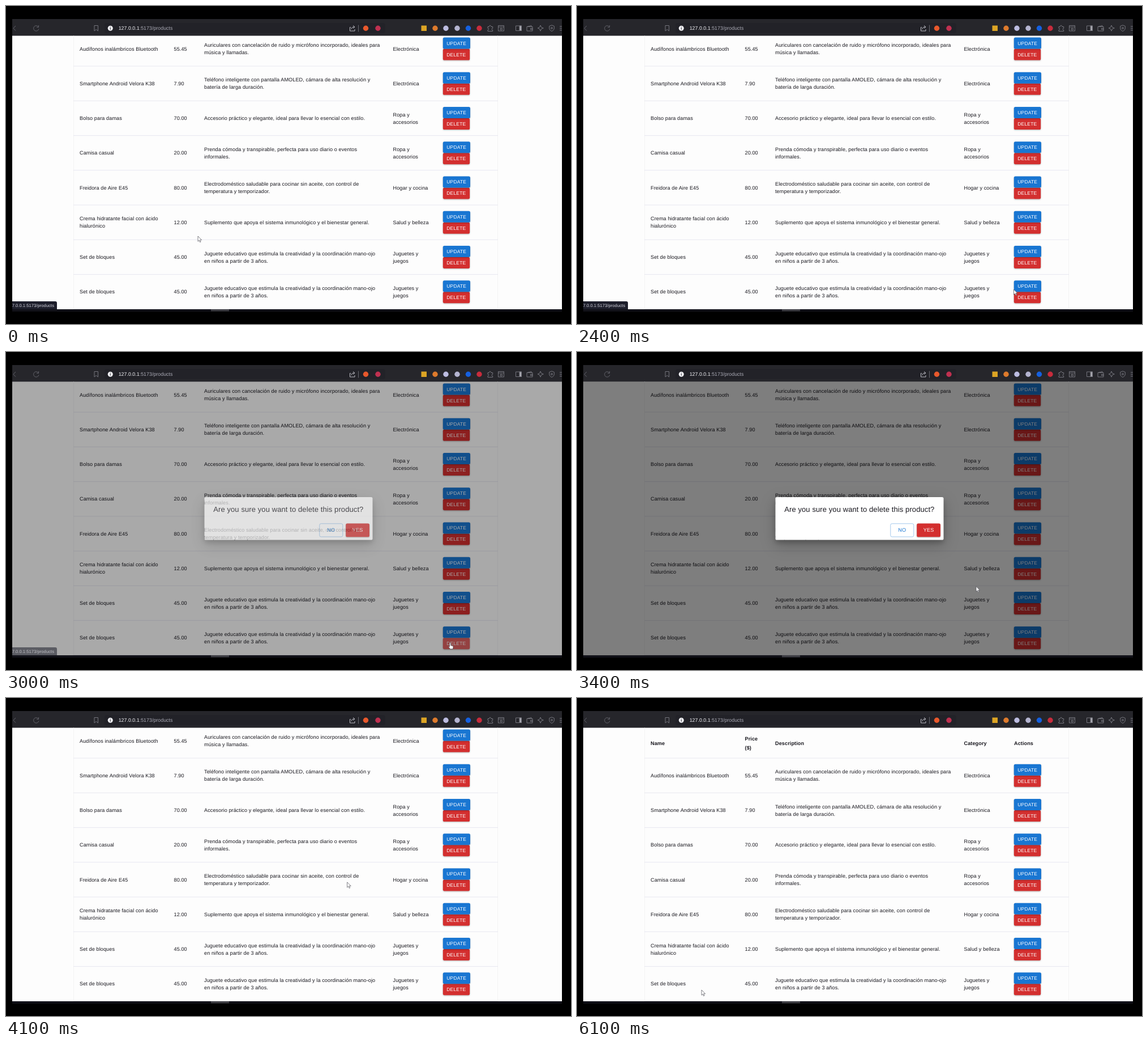
Recreate the animation shown at these times as an HTML page. Size 998 by 561 pixels, loop 6.2 s.

```html
<!DOCTYPE html>
<html lang="es">
<head>
<meta charset="utf-8">
<title>Products</title>
<style>
  html, body { margin: 0; width: 100%; height: 100%; overflow: hidden; background: #000; }
  svg { display: block; width: 998px; height: 561px; }
  text {
    font-family: "Liberation Sans", Arial, sans-serif;
    font-size: 9.1px; letter-spacing: .0107em; fill: #19181f;
    text-rendering: geometricPrecision; white-space: pre;
  }
  .head { font-weight: 700; }
  .btn { font-size: 8.45px; letter-spacing: .0286em; fill: #fff; }
  .choice { font-size: 9.1px; letter-spacing: .0286em; fill: #fff; }
  .no { fill: #1976d2; }
  .title { font-size: 13px; letter-spacing: .0075em; }
  .url { font-size: 8.9px; letter-spacing: 0; fill: #f2f2f6; }
  .status { font-size: 7.7px; letter-spacing: 0; fill: #d2d2dc; }
  .raised { filter: drop-shadow(0 1px .8px rgba(0,0,0,.28)); }
  .panel { filter: drop-shadow(0 5px 4px rgba(0,0,0,.2)) drop-shadow(0 8px 13px rgba(0,0,0,.22)); }
  .icon { fill: none; stroke: #74747c; stroke-width: 1; }
</style>
</head>
<body>
<svg id="stage" viewBox="0 0 998 561" xmlns="http://www.w3.org/2000/svg">
  <defs>
    <clipPath id="view"><rect x="11" y="52.5" width="971" height="482.5"/></clipPath>
    <clipPath id="window"><rect x="11" y="22" width="971" height="518"/></clipPath>
  </defs>
  <rect width="998" height="561"/>

  <g clip-path="url(#window)">
    <rect x="11" y="23" width="971" height="30" fill="#26262b"/>
    <rect x="174" y="30" width="496" height="18" rx="4" fill="#222228"/>
    <g class="icon">
      <g stroke="#62626a">
        <path d="M17 35l-4 4.3 4 4.3"/>
        <path d="M57 36.5a4.7 4.7 0 1 0 .9 4M57.6 34v3.4h-3.4"/>
      </g>
      <path d="M156 34.5h6.5v9.5l-3.2-2.6-3.3 2.6z"/>
      <path d="M609 37.5h-1.5v6.5h8.5v-3M610 41c.3-3 2-4 5.5-4M613 34.5l3 2.5-3 2.5" stroke="#bcbcc4"/>
      <path d="M622.5 33.5v12" stroke="#686870"/>
      <path d="M851 36.5h2.5c-.8-3 4-3 3.2 0h3v3c-2.5-.5-2.5 3.4 0 2.8v2.2h-8.7v-2.4c2.4.5 2.4-3.3 0-2.7z"/>
      <path d="M869.5 34.5h10v9.5h-10zM869.5 37h10M873 39.5h3.5v2.5h-3.5z"/>
      <path d="M900.5 35h10v8.5h-10z"/><path d="M907 35h3.5v8.5H907z" fill="#a8a8b0"/>
      <path d="M920 36.5h10v7.5h-10zM920 36.5l8-2v2M926.5 39.5h3.5v2h-3.5z"/>
      <path d="M944 34l1.5 3.5 3.8 1.5-3.8 1.5-1.5 3.7-1.5-3.7-3.4-1.5 3.4-1.5z"/>
      <path d="M964 33.8l4.3 1.7v3.5c0 2.8-1.8 4.4-4.3 5.5-2.5-1.1-4.3-2.7-4.3-5.5v-3.5z"/>
      <circle cx="964" cy="39" r="1.4"/>
      <path d="M978 36h6M978 39.3h6M978 42.6h6"/>
    </g>
    <g id="marks"></g>
    <circle cx="184.3" cy="39.3" r="4.5" fill="#f2f2f6"/>
    <path d="M184.3 38.6v3M184.3 36.6v1" stroke="#222228" stroke-width="1.1"/>
    <text class="url" x="198.7" y="42.3">127.0.0.1<tspan fill="#a9a9b4">:5173/products</tspan></text>

    <rect x="11" y="535" width="971" height="4" fill="#111118"/>
    <rect x="362" y="535" width="32" height="3.5" fill="#3e3e44"/>

    <g clip-path="url(#view)">
      <rect x="11" y="52" width="971" height="483" fill="#fdfdfd"/>
      <path d="M119.5 52v483M868.5 52v483" stroke="#f3f3f4"/>
      <g id="before"></g>
      <g id="after"></g>
      <rect id="ripple" x="771.8" y="504" width="47.4" height="20" rx="2.6" fill="#fff"/>
      <rect id="shade" x="11" y="52" width="971" height="483"/>
      <g id="dialog">
        <rect class="panel" x="350.5" y="256" width="297" height="75.5" rx="2.6" fill="#fff"/>
        <text class="title" x="366.2" y="281.5">Are you sure you want to delete this product?</text>
        <rect x="553.8" y="302.8" width="41" height="23.2" rx="2.6" fill="none" stroke="#8cbae8" stroke-width=".8"/>
        <text class="choice no" x="574.3" y="317.4" text-anchor="middle">NO</text>
        <rect id="yes" class="raised" x="600.2" y="302.5" width="41.8" height="23.8" rx="2.6"/>
        <rect id="yesRipple" x="600.2" y="302.5" width="41.8" height="23.8" rx="2.6" fill="#fff"/>
        <text class="choice" x="621.2" y="317.4" text-anchor="middle">YES</text>
      </g>
      <g id="status">
        <path d="M11 521h76q3 0 3 3v11H11z" fill="#1d1e2b"/>
        <text class="status" x="85" y="530.8" text-anchor="end">7.0.0.1:5173/products</text>
      </g>
    </g>
    <g id="cursor" fill="#fff" stroke="#4c4c55" stroke-width=".7" stroke-linejoin="round">
      <path id="arrow" d="M0 0v9.3l2.1-2 1.5 3.4 1.5-.7-1.5-3.2h3z"/>
      <path id="hand" d="M-.9 .8q1-1.6 2 0v3.4l3.4.8q1.2.4 1 1.8l-.6 3.6H0L-2.6 6.8q.2-1.4 1.7-.3z"/>
    </g>
  </g>
</svg>
<script>
const LOOP = 6200, STEP = 100;
const ROW = 61.24, TOP = 75.5;
const COLS = [130, 296.5, 350, 683.5, 772];
const $ = id => document.getElementById(id);

// "|" marks a line break inside a cell
const products = [
  ["Audífonos inalámbricos Bluetooth", "55.45", "Auriculares con cancelación de ruido y micrófono incorporado, ideales para|música y llamadas.", "Electrónica"],
  ["Smartphone Android Velora K38", "7.90", "Teléfono inteligente con pantalla AMOLED, cámara de alta resolución y|batería de larga duración.", "Electrónica"],
  ["Bolso para damas", "70.00", "Accesorio práctico y elegante, ideal para llevar lo esencial con estilo.", "Ropa y|accesorios"],
  ["Camisa casual", "20.00", "Prenda cómoda y transpirable, perfecta para uso diario o eventos|informales.", "Ropa y|accesorios"],
  ["Freidora de Aire E45", "80.00", "Electrodoméstico saludable para cocinar sin aceite, con control de|temperatura y temporizador.", "Hogar y cocina"],
  ["Crema hidratante facial con ácido|hialurónico", "12.00", "Suplemento que apoya el sistema inmunológico y el bienestar general.", "Salud y belleza"],
  ["Set de bloques", "45.00", "Juguete educativo que estimula la creatividad y la coordinación mano-ojo|en niños a partir de 3 años.", "Juguetes y|juegos"]
];
const header = ["Name", "Price|($)", "Description", "Category", "Actions"];

function cell(value, x, mid, gap, cls = "") {
  const lines = value.split("|");
  return lines.map((line, i) => {
    const y = mid + 3.2 + (i - (lines.length - 1) / 2) * gap;
    return `<text class="${cls}" x="${x}" y="${y}">${line}</text>`;
  }).join("");
}

function button(label, y, width, color) {
  return `<rect class="raised" x="771.8" y="${y}" width="${width}" height="20" rx="2.6" fill="${color}"/>
    <text class="btn" x="778.2" y="${y + 13}">${label}</text>`;
}

const border = y => `<path d="M119 ${y}H869" stroke="#e6e6f0" stroke-width=".9"/>`;

function productRow(data, slot) {
  const mid = TOP + slot * ROW;
  return data.map((value, i) => cell(value, COLS[i], mid, 13)).join("") +
    button("DELETE", mid, 47.4, "#d32f2f") +
    button("UPDATE", mid - 20, 48.2, "#1976d2") +
    border(mid + 30.6);
}

$("before").innerHTML = [...products, products[6]].map(productRow).join("");
$("after").innerHTML =
  header.map((value, i) => cell(value, COLS[i], 80, 15.6, "head")).join("") + border(106.1) +
  products.map((p, i) => productRow(p, i + 1)).join("");

const marks = [[635.5, "#e8582c"], [657, "#c03050"], [758, "#dd7a2c"], [777, "#bcbce0"],
  [797, "#b4b4d0"], [816.5, "#1560e0"], [836, "#c82c3c"]];
$("marks").innerHTML = '<rect x="733.5" y="34.5" width="9.5" height="9.5" fill="#dca424"/>' +
  marks.map(([x, color]) => `<circle cx="${x}" cy="39.2" r="4.7" fill="${color}"/>`).join("");

// [time, x, y]
const path = [[0, 339, 406], [1300, 692, 485], [2400, 771.5, 500], [2800, 784.5, 513.5],
  [3100, 784.5, 513.5], [3700, 625.5, 313.5], [4000, 625.5, 313.5], [4700, 213, 519],
  [5100, 213, 519], [5600, 217, 517], [6100, 220, 515]];
// [time, value]
const shadeSteps = [[2900, 0], [3000, .67], [3100, .93], [3200, 1], [3900, 1], [4000, .5], [4100, 0]];
const statusSteps = [[2900, 1], [3000, .55], [3100, 0]];
const rippleSteps = [[2800, 0], [2900, .2], [3000, .24], [3200, 0]];
const yesSteps = [[3700, 0], [3900, .14], [4100, 0]];

function track(steps, t, col = 1, ease = k => k) {
  if (t <= steps[0][0]) return steps[0][col];
  const i = steps.findIndex(s => s[0] >= t);
  if (i < 0) return steps[steps.length - 1][col];
  const a = steps[i - 1], b = steps[i];
  return a[col] + (b[col] - a[col]) * ease((t - a[0]) / (b[0] - a[0]));
}

const smooth = k => k * k * (3 - 2 * k);
const fade = (id, value) => $(id).setAttribute("opacity", value);
const show = (id, on) => { $(id).style.display = on ? "" : "none"; };

function draw(t) {
  const open = track(shadeSteps, t);
  const x = track(path, t, 1, smooth), y = track(path, t, 2, smooth);
  const overDelete = t >= 2600 && t <= 3100;
  const overYes = t >= 3600 && t <= 4000;

  show("before", t < 4200);
  show("after", t >= 4200);
  show("dialog", open > 0);
  fade("shade", open * .5);
  fade("dialog", open);
  fade("status", track(statusSteps, t));
  fade("ripple", track(rippleSteps, t));
  fade("yesRipple", track(yesSteps, t));
  $("yes").setAttribute("fill", overYes ? "#c62828" : "#d32f2f");
  show("hand", overDelete || overYes);
  show("arrow", !(overDelete || overYes));
  $("cursor").setAttribute("transform", `translate(${x} ${y})`);
}

const start = performance.now();
function tick() {
  const t = (performance.now() - start) % LOOP;
  draw(Math.floor(t / STEP) * STEP);
  requestAnimationFrame(tick);
}
draw(0);
requestAnimationFrame(tick);
</script>
</body>
</html>
```
